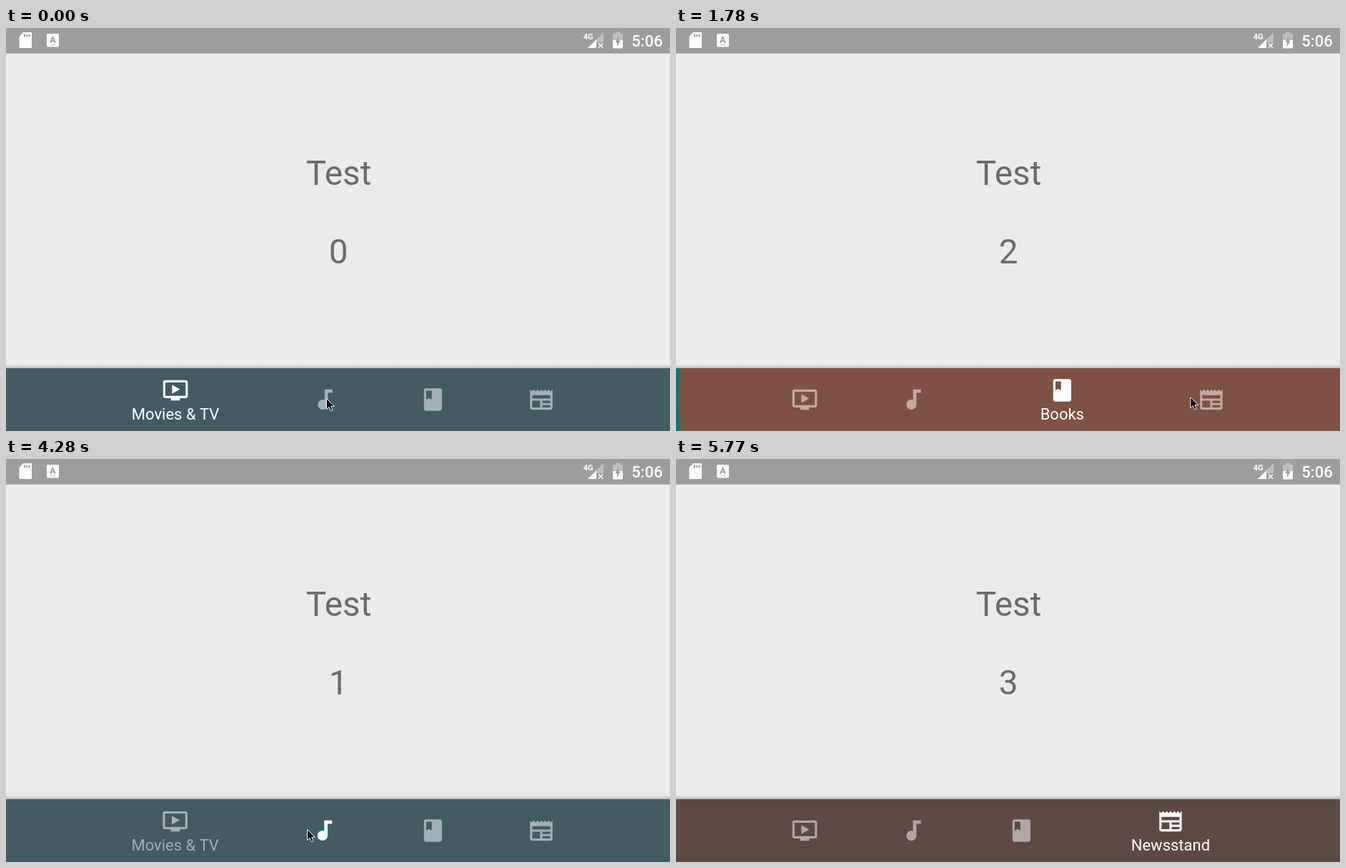
An HTML page with a canvas that plays this animation: 929 px wide and 565 px high, repeating every 6.24 s.

```html
<!DOCTYPE html>
<html lang="en">
<head>
<meta charset="utf-8">
<title>Bottom navigation</title>
<style>
html, body { margin: 0; width: 100%; height: 100%; overflow: hidden; background: #ebebeb; }
canvas { display: block; }
</style>
</head>
<body>
<canvas id="stage" width="929" height="565"></canvas>
<script>
const ctx = document.getElementById('stage').getContext('2d');
const W = 929, H = 565, LOOP = 6240;
const BAR_TOP = 477, BAR_MID = 521, LIFT = 13, DP = 88 / 56;
const SMALL = 151.6, LARGE = 265.6;
const RIPPLE_MS = 318, SHIFT_MS = 170, MS_PER_PX = 1.5;
const DIM = 0.52, GRAY = '#9d9d9d', FAINT = 'rgba(255,255,255,.35)', INK = '#6b6b6b';

// Where the pointer taps: each tap selects the next tab, then the pointer leaves.
const stops = [
  { tap: 865, leave: 1221, x: 448, y: 519 },
  { tap: 1594, leave: 1641, x: 590, y: 512 },
  { tap: 2120, leave: 2254, x: 742, y: 518 },
  { tap: 3270, leave: 3760, x: 216, y: 522 },
  { tap: 4270, leave: 4370, x: 421, y: 519 },
  { tap: 4743, leave: 4950, x: 596, y: 524 },
  { tap: 5305, leave: 5560, x: 745, y: 522 },
  { tap: LOOP, leave: LOOP, x: 800, y: 575 }
];

const lerp = (a, b, p) => a + (b - a) * p;
const unit = v => Math.min(1, Math.max(0, v));
const sine = p => 0.5 - 0.5 * Math.cos(Math.PI * p);
const quad = p => p < 0.5 ? 2 * p * p : 1 - 2 * (1 - p) ** 2;
const easeOut = p => 1 - (1 - p) ** 2;

function shape(points, path = new Path2D()) {
  points.forEach(([x, y], i) => i ? path.lineTo(x, y) : path.moveTo(x, y));
  path.closePath();
  return path;
}

// A hole runs against the outline's direction.
const hole = (path, x, y, w, h) => path.rect(x + w, y, -w, h);

// Icons on a 24-unit grid.
function screenIcon() {
  const p = new Path2D();
  p.roundRect(1, 3, 22, 16, 2);
  hole(p, 3, 5, 18, 12);
  p.rect(8, 19, 8, 2);
  return shape([[9, 7], [16, 11], [9, 15]], p);
}

function noteIcon() {
  const p = new Path2D();
  p.arc(10.5, 16.5, 4.5, 0, 2 * Math.PI);
  p.rect(12, 3, 3, 13.5);
  p.rect(12, 3, 7, 3);
  return p;
}

function bookIcon() {
  const p = new Path2D();
  p.roundRect(4, 2, 16, 20, 2);
  return shape([[6, 4], [6, 12], [8.5, 10.5], [11, 12], [11, 4]], p);
}

function paperIcon() {
  const p = new Path2D();
  p.moveTo(2, 3);
  for (let i = 1; i <= 12; i++) p.lineTo(2 + i * 20 / 12, i % 2 ? 4.67 : 3);
  p.arcTo(22, 21, 2, 21, 2);
  p.arcTo(2, 21, 2, 3, 2);
  p.closePath();
  hole(p, 4, 8, 16, 3);
  hole(p, 4, 13, 7, 6);
  hole(p, 13, 13, 7, 2);
  hole(p, 13, 17, 7, 2);
  return p;
}

const tabs = [
  { label: 'Movies & TV', color: '#425b65', icon: screenIcon() },
  { label: 'Music', color: '#007b6b', icon: noteIcon() },
  { label: 'Books', color: '#7d5144', icon: bookIcon() },
  { label: 'Newsstand', color: '#5d4844', icon: paperIcon() }
];

const arrow = shape([[0.5, 0.5], [0.5, 15.5], [4, 12.3], [6.4, 17.8], [9, 16.7], [6.6, 11.3], [11.3, 11.3]]);

function fill(path, color) {
  ctx.fillStyle = color;
  ctx.fill(path);
}

function rect(x, y, w, h, color, r = 0) {
  const p = new Path2D();
  p.roundRect(x, y, w, h, r);
  fill(p, color);
}

function text(s, x, y, size, color, weight = 400) {
  ctx.font = `${weight} ${size}px Roboto, sans-serif`;
  ctx.textAlign = 'center';
  ctx.fillStyle = color;
  ctx.fillText(s, x, y);
}

function drawStatusBar() {
  rect(0, 0, W, 35.7, GRAY);

  // Memory card
  fill(shape([[24, 6], [36, 6], [36, 28], [18.5, 28], [18.5, 12]]), '#fff');
  // Keyboard notice
  rect(57, 8, 17, 18.5, '#fff', 2);
  text('A', 65.5, 21, 13, GRAY, 700);
  for (let i = 0; i < 3; i++) {
    rect(25 + i * 3.4, 8.5, 2, 4, GRAY);
    rect(62.5 + i * 2.5, 23, 1.3, 1.3, GRAY);
  }

  // Signal
  text('4G', 814.7, 16, 11, '#fff', 700);
  fill(shape([[836, 6], [836, 20], [826, 20], [826, 16]]), FAINT);
  fill(shape([[814, 28], [826, 16], [826, 28]]), '#fff');
  ctx.strokeStyle = '#fff';
  ctx.lineWidth = 1.7;
  ctx.stroke(new Path2D('M829 21.5l6 6m0-6l-6 6'));

  // Battery
  rect(853, 5.5, 6, 2.5, FAINT);
  rect(849, 8, 14, 9, FAINT);
  rect(849, 17, 14, 11.5, '#fff', [0, 0, 1.5, 1.5]);
  fill(shape([[857.2, 11.3], [857.2, 17.6], [859.5, 17.6], [854.9, 26.2], [854.9, 19.9], [852.6, 19.9]]), GRAY);

  text('5:06', 897, 26, 22, '#fff', 500);
}

// Tab centres when tab i is grown by weights[i].
function centers(weights) {
  let edge = (W - 3 * SMALL - LARGE) / 2;
  return weights.map(w => {
    const width = lerp(SMALL, LARGE, w);
    edge += width;
    return edge - width / 2;
  });
}

function drawTab(tab, x, grown, tint) {
  ctx.save();
  ctx.globalAlpha = tint;
  ctx.translate(x, BAR_MID - LIFT * grown);
  ctx.scale(DP, DP);
  ctx.translate(-12, -12);
  fill(tab.icon, '#fff');
  ctx.restore();

  ctx.globalAlpha = tint * grown;
  text(tab.label, x, 549, 22 * lerp(0.7, 1, grown), '#fff');
  ctx.globalAlpha = 1;
}

function drawBar(from, to, age) {
  const shadow = ctx.createLinearGradient(0, BAR_TOP - 5, 0, BAR_TOP);
  shadow.addColorStop(0, 'rgba(0,0,0,0)');
  shadow.addColorStop(1, 'rgba(0,0,0,.22)');
  rect(0, BAR_TOP - 5, W, 5, shadow);

  ctx.save();
  ctx.beginPath();
  ctx.rect(0, BAR_TOP, W, H - BAR_TOP);
  ctx.clip();

  rect(0, BAR_TOP, W, H - BAR_TOP, tabs[from].color);
  const origin = centers(tabs.map((_, i) => +(i === from)))[to];
  const ripple = new Path2D();
  const spread = sine(unit(age / RIPPLE_MS));
  ripple.arc(origin, BAR_MID + 1, lerp(5, W, spread), 0, 2 * Math.PI);
  fill(ripple, tabs[to].color);

  const grow = quad(unit(age / SHIFT_MS));
  const weights = tabs.map((_, i) => i === to ? grow : i === from ? 1 - grow : 0);
  const xs = centers(weights);
  tabs.forEach((tab, i) => drawTab(tab, xs[i], weights[i], i === to ? 1 : DIM));
  ctx.restore();
}

function drawPointer(t) {
  const i = Math.max(0, stops.findLastIndex(s => s.leave <= t));
  const a = stops[i], b = stops[i + 1];
  const travel = MS_PER_PX * Math.hypot(b.x - a.x, b.y - a.y);
  const p = easeOut(unit((t - a.leave) / travel));
  ctx.save();
  ctx.translate(lerp(a.x, b.x, p), lerp(a.y, b.y, p));
  fill(arrow, '#000');
  ctx.strokeStyle = '#fff';
  ctx.lineWidth = 1;
  ctx.stroke(arrow);
  ctx.restore();
}

function draw(t) {
  const count = stops.filter(s => s.tap <= t).length;
  const to = count % 4, from = (count + 3) % 4;
  const age = count ? t - stops[count - 1].tap : LOOP;

  rect(0, 0, W, H, '#ebebeb');
  drawStatusBar();
  text('Test', 465.5, 220, 47.6, INK);
  text(to, 465.2, 330, 47.6, INK);
  drawBar(from, to, age);
  drawPointer(t);
}

const begin = performance.now();
function tick() {
  draw((performance.now() - begin) % LOOP);
  requestAnimationFrame(tick);
}
tick();
</script>
</body>
</html>
```
